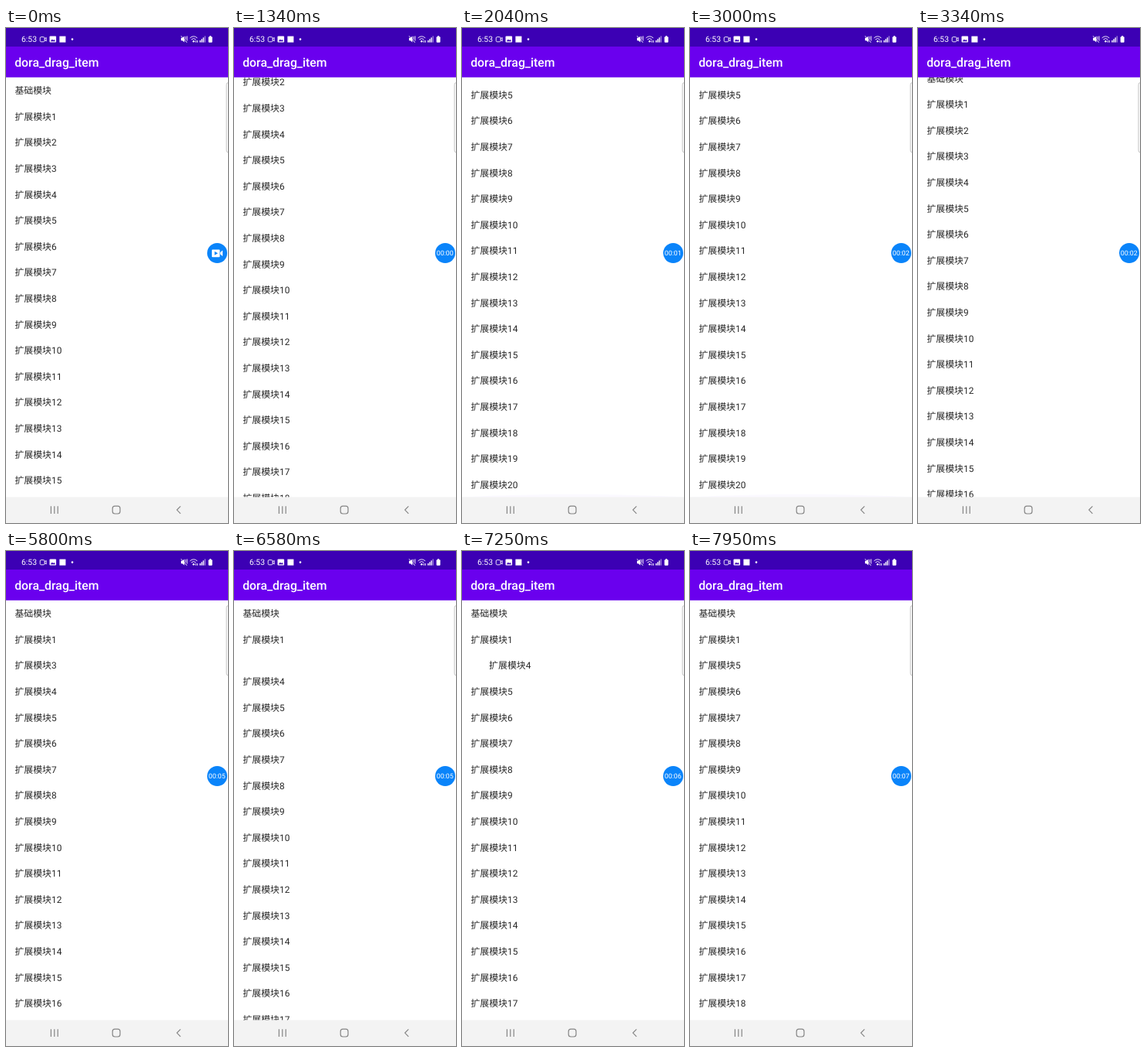
These frames come from a looping animation (288 px wide and 640 px high, 8 s). An HTML page:

```html
<!DOCTYPE html>
<html lang="zh-CN">
<head>
<meta charset="utf-8">
<title>dora_drag_item</title>
<style>
html, body { margin: 0; width: 100%; height: 100%; overflow: hidden; background: #fff; }
svg { display: block; width: 288px; height: 640px; font-family: Roboto, "Noto Sans CJK SC", "Noto Sans CJK", sans-serif; text-rendering: geometricPrecision; }
#rows { font-size: 11.9px; fill: #272727; }
#title { font-size: 15.8px; font-weight: 500; fill: #fff; }
#clock { font-size: 10.4px; fill: #fff; }
#timer { font-size: 8.8px; fill: #fff; text-anchor: middle; }
.line { fill: none; stroke: #fff; stroke-width: .9; }
.nav { fill: none; stroke: #858585; stroke-width: 1.2; }
</style>
</head>
<body>
<svg viewBox="0 0 288 640">
  <rect width="288" height="640" fill="#fff"/>
  <g id="rows"></g>
  <path id="glow" fill="#6200ee"/>
  <path d="M290 70.5H288.5Q286 70.5 286 73.5V158Q286 161 288.5 161H290" fill="#fcfcfc" stroke="#b5b5b5" stroke-width=".8"/>

  <rect width="288" height="24" fill="#3c00b4"/>
  <rect y="24" width="288" height="39.8" fill="#6a00ee"/>

  <text id="title" x="11.2" y="49.6">dora_drag_item</text>

  <text id="clock" x="20" y="18.4">6:53</text>
  <g class="line">
    <rect x="44.2" y="11.6" width="5.8" height="6.2" rx="1.4"/>
    <path d="M50 14L52.2 12.4V17L50 15.4"/>
  </g>
  <rect x="56.5" y="10.6" width="8.6" height="8" rx="1" fill="#fff"/>
  <path d="M57.8 17.2L59.8 14.4L61.2 16L62.4 14.8L64 17.2Z" fill="#3c00b4"/>
  <rect x="69.4" y="10.6" width="8" height="8" fill="#fff"/>
  <circle cx="86" cy="14.6" r="1.3" fill="#fff"/>

  <path d="M227 12.8H228.8L231.4 10.4V18.6L228.8 16.2H227Z" fill="#fff"/>
  <path class="line" d="M227 10.2L234.8 18.8M233 10.8V15M235 10.4V16.6"/>
  <g class="line">
    <path d="M238.6 12.9Q243.4 8.7 248.2 12.9M240.4 14.9Q243.4 12.3 246.4 14.9"/>
    <path d="M246.4 16V18.8M248.4 16V18.8"/>
  </g>
  <circle cx="243.4" cy="17.2" r="1.3" fill="#fff"/>
  <g fill="#fff">
    <rect x="251.2" y="16" width="1.4" height="2.6"/>
    <rect x="253.3" y="14.2" width="1.4" height="4.4"/>
    <rect x="255.4" y="12.3" width="1.4" height="6.3"/>
    <rect x="257.5" y="10.4" width="1.4" height="8.2" opacity=".5"/>
    <rect x="262.6" y="11.2" width="5" height="7.6" rx="1"/>
    <rect x="264" y="10.2" width="2.2" height="1.4"/>
  </g>

  <rect y="606.4" width="288" height="34" fill="#f3f3f3"/>
  <g class="nav">
    <path d="M58.4 618.2V628M62.8 618.2V628M67.2 618.2V628"/>
    <rect x="138.2" y="618.2" width="9.8" height="9.8" rx="3"/>
    <path d="M226.4 618.4L221.8 623.1L226.4 627.8"/>
  </g>

  <circle cx="274" cy="291" r="13" fill="#0a84fa"/>
  <g id="camera">
    <rect x="267" y="286.4" width="10.4" height="9.8" rx="1" fill="#fff"/>
    <path d="M278 290L281 287.6V295L278 292.6Z" fill="#fff"/>
    <path d="M270.6 288.8L274.8 291.3L270.6 293.8Z" fill="#0a84fa"/>
  </g>
  <text id="timer" x="273.8" y="294.4"></text>
</svg>
<script>
const LOOP = 8000, COUNT = 21, TOP = 63.2, BOTTOM = 606.4, PITCH = 33.6;
const END = COUNT * PITCH - (BOTTOM - TOP);
const get = id => document.getElementById(id);

// Each pair is [time, value]; a value holds until the next time.
const scrollSteps = [[0, 0], [1240, 6], [1290, 32], [1340, 78], [1390, 126], [1440, END],
  [3190, 150], [3240, 112], [3290, 63], [3340, 15.5], [3390, 0]];
const ticks = [[0, -1], [40, 0], [1740, 1], [3000, 2], [4020, 3], [4830, 4], [5800, 5], [6950, 6], [7900, 7]];
const swipes = [
  { row: 2, close: 5180, wait: 100, alpha: .1, steps: [[0, 0], [4830, -55], [4930, -288]] },
  { row: 3, close: 6475, wait: 55, alpha: 1, steps: [[0, 0], [6130, 14], [6230, 288]] },
  { row: 4, close: 7700, wait: 100, alpha: 1, steps: [[0, 0], [7250, 23.7], [7280, 66], [7330, 140], [7380, 220], [7430, 288]] }
];

function held(steps, t) {
  let value = steps[0][1];
  for (const [at, v] of steps) if (t >= at) value = v;
  return value;
}

const rows = Array.from({ length: COUNT }, (_, i) => {
  const el = document.createElementNS("http://www.w3.org/2000/svg", "text");
  el.textContent = i ? "扩展模块" + i : "基础模块";
  get("rows").append(el);
  return el;
});

// How far the gap left by a swiped row has closed, 0 to 1.
function closed({ close, wait }, t) {
  const age = t - close;
  if (age < wait) return 0;
  const p = Math.min(1, (wait + Math.floor((age - wait) / 50) * 50) / 250);
  return (1 - Math.cos(Math.PI * p)) / 2;
}

function drawGlow(t) {
  const atTop = t >= 3190;
  const age = t - (atTop ? 3390 : 1440);
  const life = atTop ? 450 : 300;
  let power = 0;
  if (age >= 0) power = Math.max(0, 1 - Math.floor(age / 50) * 50 / life);
  if (!atTop && age >= 0) power = Math.max(power, .15);
  const edge = atTop ? TOP : BOTTOM;
  const peak = edge + (atTop ? 1 : -1) * 50 * power;
  get("glow").setAttribute("d", `M0 ${edge}Q144 ${peak} 288 ${edge}Z`);
  get("glow").setAttribute("opacity", .15 * power);
}

function draw(t) {
  const scroll = held(scrollSteps, t);
  const gaps = swipes.map(s => closed(s, t));
  rows.forEach((el, i) => {
    let slot = i, x = 0, alpha = 1;
    swipes.forEach((s, k) => {
      if (i > s.row) slot -= gaps[k];
      if (i === s.row) {
        x = held(s.steps, t);
        if (x) alpha = Math.abs(x) < 288 ? s.alpha : 0;
      }
    });
    el.setAttribute("x", 11.4 + x);
    el.setAttribute("y", TOP + 21.9 + slot * PITCH - scroll);
    el.setAttribute("opacity", alpha);
  });
  drawGlow(t);
  const sec = held(ticks, t);
  get("camera").style.display = sec < 0 ? "" : "none";
  get("timer").textContent = sec < 0 ? "" : "00:0" + sec;
}

const start = performance.now();
function frame() {
  draw((performance.now() - start) % LOOP);
  requestAnimationFrame(frame);
}
frame();
</script>
</body>
</html>
```
